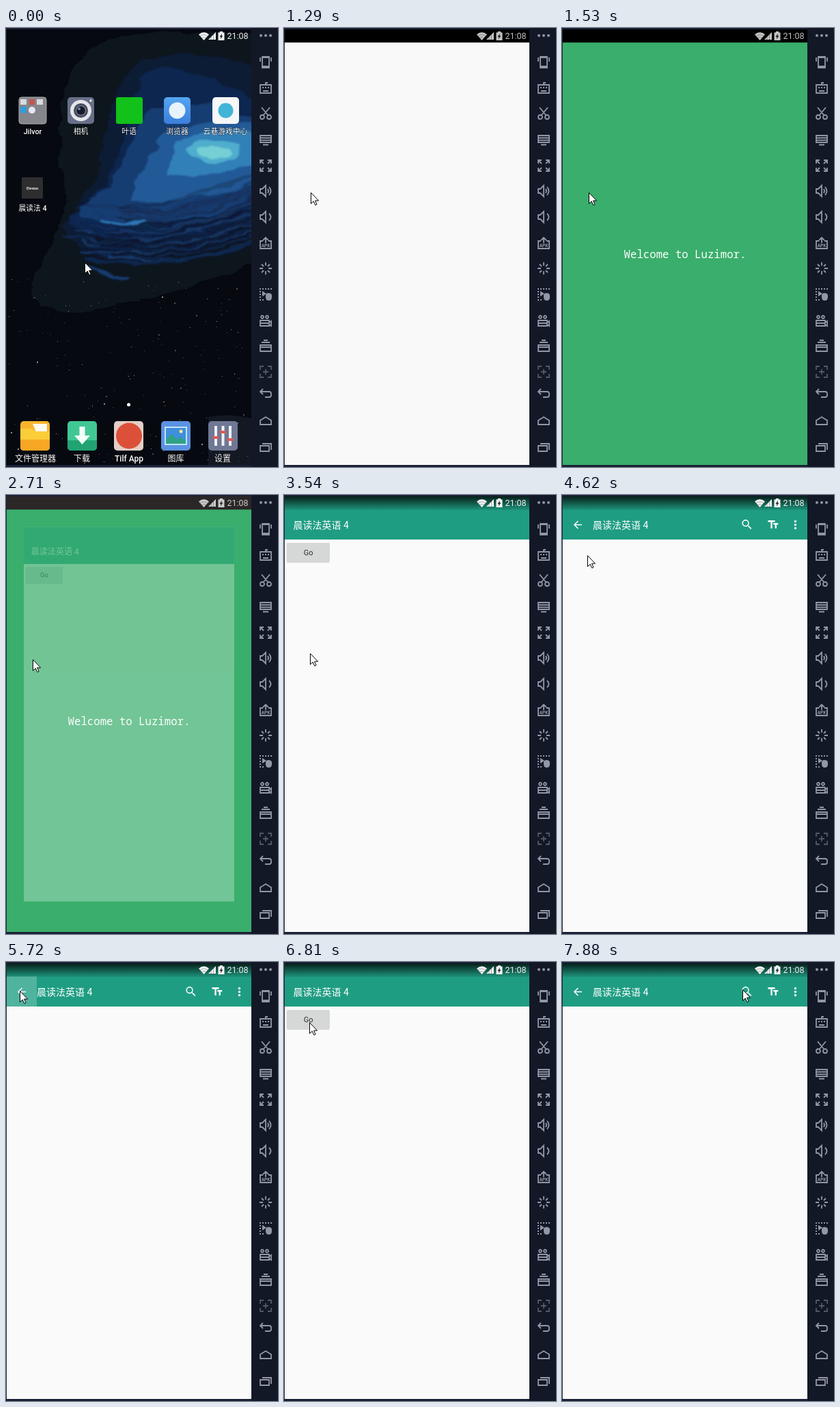
Write an HTML page that moves like this. It is 398x641 px and loops after 8 s.

```html
<!DOCTYPE html>
<html lang="zh">
<head>
<meta charset="utf-8">
<title>Phone screen</title>
<style>
  html, body { margin: 0; height: 100%; overflow: hidden; background: #131826; }
  svg { display: block; width: 398px; height: 641px; }
  text { font-family: Roboto, "Noto Sans CJK SC", "Noto Sans CJK", sans-serif; }
  #labels text { fill: #fff; text-anchor: middle; font-weight: 500; paint-order: stroke; stroke: #0008; stroke-width: 1px; }
  .title { font-size: 14px; fill: #fff; }
  .layer { transform-origin: 180px 320px; }
  #side { fill: none; stroke: #9197a6; stroke-width: 1.8; }
  #side .fill { fill: #9197a6; stroke: none; }
</style>
</head>
<body>
<svg viewBox="0 0 398 641">
  <defs>
    <clipPath id="screen"><path d="M1 2H359V638H1z"/></clipPath>
    <linearGradient id="shade" x2="0" y2="1">
      <stop stop-color="#000" stop-opacity=".8"/><stop offset="1" stop-color="#000" stop-opacity=".06"/>
    </linearGradient>
    <linearGradient id="blue" x2="0" y2="1"><stop stop-color="#55a5f0"/><stop offset="1" stop-color="#3a7fdc"/></linearGradient>
    <filter id="brush" x="-10%" y="-10%" width="120%" height="120%">
      <feTurbulence type="fractalNoise" baseFrequency=".02 .05" numOctaves="3" seed="4"/>
      <feDisplacementMap in="SourceGraphic" scale="18" xChannelSelector="R" yChannelSelector="G"/>
      <feGaussianBlur stdDeviation="1.2"/>
    </filter>
  </defs>

  <g clip-path="url(#screen)">
    <g id="home">
      <path fill="#060910" d="M0 0H360V640H0z"/>
      <g filter="url(#brush)" fill="none">
        <path fill="#0c121f" d="M90 70Q120 12 195 8H380V335Q300 375 220 392Q110 428 50 405Q25 370 60 330Q85 290 88 230Q66 150 90 70z"/>
        <path fill="#0d1a35" d="M195 45Q260 25 380 60V300Q250 335 170 345Q95 330 85 285Q110 260 140 200Q150 90 195 45z"/>
        <path fill="#10264f" d="M205 65Q255 40 380 115V275Q250 318 150 308Q85 295 95 272Q150 240 165 180Q180 100 205 65z"/>
        <path fill="#173d72" d="M205 125Q270 90 380 135V250Q270 292 140 285Q95 278 110 262Q155 235 172 195Q185 145 205 125z"/>
        <path fill="#225a97" d="M228 160Q290 125 380 140V222Q290 255 180 250Q205 195 228 160z"/>
        <path fill="#3180b8" d="M248 168Q300 142 380 152V196Q315 218 238 214z"/>
        <ellipse cx="303" cy="181" rx="38" ry="17" fill="#4fadcd"/>
        <ellipse cx="305" cy="183" rx="24" ry="9" fill="#74cfd4"/>
        <g id="strokes"></g>
        <path stroke="#2d74b4" stroke-width="5" d="M135 283Q170 292 205 282"/>
        <path stroke="#173a6c" stroke-width="5" d="M115 348Q145 362 182 366"/>
      </g>
      <g id="stars"></g>
      <path fill="#242b3a" opacity=".45" d="M296 568Q325 562 359 570V638H296z"/>

      <rect x="19" y="101" width="40" height="39" rx="4" fill="#85868c" stroke="#a9a9ad"/>
      <path fill="#d8dadd" d="M21 104h9v8h-9zM45 104h9v8h-9z"/>
      <path fill="#c8544b" d="M34 104h8v8h-8z"/>
      <path fill="#2d9fda" d="M21 115h9v9h-9z"/>
      <circle cx="38" cy="120" r="5" fill="#e6e6ef"/>

      <rect x="90" y="101" width="39" height="39" rx="5" fill="#686f88"/>
      <circle cx="109.500" cy="120.500" r="15.500" fill="#e4e6ea"/>
      <circle cx="109.500" cy="120.500" r="10.500" fill="#454a5e"/>
      <circle cx="109.500" cy="120.500" r="7" fill="#171a26" stroke="#6d7590" stroke-width="1.500"/>
      <circle cx="107" cy="118" r="2" fill="#7c86a5"/>
      <circle cx="124" cy="106" r="1.700" fill="#f4f4f4"/>

      <rect x="161" y="101" width="39" height="39" rx="3" fill="#12c11a"/>
      <rect x="231" y="101" width="39" height="39" rx="5" fill="url(#blue)"/>
      <circle cx="250.500" cy="120.500" r="12" fill="#e8f2fb"/>
      <rect x="302" y="101" width="39" height="39" rx="5" fill="#f4f6f7"/>
      <circle cx="321.500" cy="120.500" r="11" fill="#42b4d8"/>

      <path fill="#2e2e2f" d="M23 218h31v31h-31z"/>
      <text x="38.500" y="236" text-anchor="middle" fill="#eee" style="font:700 7px 'Liberation Serif',serif">Demo</text>
      <circle cx="179.500" cy="550" r="2.500" fill="#fff"/>

      <g transform="translate(21 574)">
        <rect width="43" height="43" rx="5" fill="#f8b52c"/>
        <path fill="#fffaf0" d="M18 4H39V16H23z"/>
        <path fill="#fbcd38" d="M0 11H17L22 15H43V38a5 5 0 0 1-5 5H5a5 5 0 0 1-5-5z"/>
        <path fill="#f6a723" d="M0 27H43V38a5 5 0 0 1-5 5H5a5 5 0 0 1-5-5z"/>
      </g>
      <g transform="translate(90 574)">
        <rect width="43" height="43" rx="5" fill="#42c794"/>
        <path fill="#22a372" d="M0 28H43V38a5 5 0 0 1-5 5H5a5 5 0 0 1-5-5z"/>
        <path fill="#f3fff9" d="M17.500 8h8v13h7.500L21.500 34 10 21h7.500z"/>
      </g>
      <rect x="158" y="574" width="43" height="43" rx="5" fill="#e2cfc6"/>
      <circle cx="180" cy="595.500" r="19" fill="#dc5039"/>
      <g transform="translate(227 574)">
        <rect width="43" height="43" rx="5" fill="#5b93e2"/>
        <path fill="#3f8fdc" stroke="#c2e2fa" stroke-width="2" d="M6 9H37V34H6z"/>
        <path fill="#2fa184" d="M7 33V27L15 19l8 8 5-4 8 6v4z"/>
        <circle cx="29" cy="15" r="2.500" fill="#f3e88a"/>
      </g>
      <g transform="translate(296 574)">
        <rect width="43" height="43" rx="5" fill="#6f7894"/>
        <path stroke="#eff1f6" stroke-width="4" d="M11 7V36M21.500 7V36M32 7V36"/>
        <path fill="#e5594f" d="M7 22h8v4H7zM17.500 14h8v4h-8zM28 25h8v4h-8z"/>
      </g>
      <g id="labels"></g>
    </g>

    <path id="blank" class="layer" fill="#f9f9f9" d="M1 2H359V638H1z"/>

    <g id="splash" class="layer">
      <path fill="#3aae6c" d="M1 2H359V638H1z"/>
      <text x="180" y="335.500" text-anchor="middle" fill="#fff" style="font:15.700px 'Noto Sans Mono',monospace">Welcome to Luzimor.</text>
    </g>

    <g id="main" class="layer">
      <path fill="#fafafa" d="M1 2H359V638H1z"/>
      <path fill="#1f9d83" d="M1 2H359V65H1z"/>
      <text class="title" x="13.500" y="49">晨读法英语 4</text>
      <path fill="#0002" d="M5 97H66V99H5z"/>
      <rect id="button" x="4" y="70" width="63" height="28" rx="1.500"/>
      <text x="35.700" y="88" text-anchor="middle" font-size="11" fill="#2a2a2a">Go</text>
    </g>

    <g id="page" class="layer">
      <path fill="#fafafa" d="M1 2H359V638H1z"/>
      <path fill="#1f9d83" d="M1 2H359V65H1z"/>
      <path id="backPress" fill="#fff" fill-opacity=".22" d="M1 21H45V65H1z"/>
      <text class="title" x="45" y="49">晨读法英语 4</text>
      <g fill="#fff">
        <path transform="translate(14 34.500) scale(.75)" d="M20 11H7.800l5.600-5.600L12 4l-8 8 8 8 1.400-1.400L7.800 13H20z"/>
        <path transform="translate(261 33.500) scale(.8)" d="M15.500 14h-.8l-.3-.3A6.500 6.500 0 1 0 9.500 16c1.600 0 3.100-.6 4.200-1.600l.3.300v.8l5 5 1.500-1.500zm-6 0a4.500 4.500 0 1 1 0-9 4.500 4.500 0 0 1 0 9z"/>
        <path transform="translate(299.500 34) scale(.78)" d="M2.500 4v3h5v12h3V7h5V4zm19 5h-9v3h3v7h3v-7h3z"/>
        <circle cx="341.500" cy="38.500" r="1.700"/><circle cx="341.500" cy="43.500" r="1.700"/><circle cx="341.500" cy="48.500" r="1.700"/>
      </g>
    </g>

    <path id="gradient" fill="url(#shade)" d="M1 2H359V22H1z"/>
    <g id="bar"><path d="M1 2H359V21H1z"/><path fill="#0003" d="M1 21H359V22H1z"/></g>
    <g id="status" fill="#f4f4f4">
      <path d="M282 9.500Q289.500 3 297 9.500L289.500 18z"/>
      <path fill="none" stroke="#0006" stroke-width=".8" d="M284 12Q289.500 7.500 295 12M286.300 14.500Q289.500 12 292.700 14.500"/>
      <path d="M307 6V17H296z"/><path stroke="#0006" stroke-width=".8" d="M300 12V17M303.500 9V17"/>
      <path d="M313 5h4v1.500h2.500V18h-9V6.500H313z"/>
      <path fill="#222" d="M316 8l-3.500 5h2l-.8 3.500 3.800-5h-2z"/>
      <text x="323.500" y="16" font-size="12.500">21:08</text>
    </g>
    <path id="cursor" fill="#fff" stroke="#000" d="M.5.5v16l3.700-3.500 2.600 5.600 2.300-1-2.500-5.500h5z"/>
  </g>

  <path fill="#131826" d="M359 0H398V641H359z"/>
  <path fill="#1a2036" d="M0 0H359V2H0zM0 638H359V641H0zM0 0H1V641H0z"/>
  <g id="side"></g>
</svg>

<script>
const $ = id => document.getElementById(id);

// Static parts: brush strokes, stars, labels, side bar
let seed = 7;
const random = () => (seed = (seed * 16807) % 2147483647) / 2147483647;

const strokeColors = ['#0c1830', '#1a4880', '#0a1224', '#143262'];
$('strokes').innerHTML = Array.from({ length: 36 }, (_, i) => {
  const depth = i / 36, x = 100 - 30 * depth + 90 * random();
  const left = 255 + 85 * depth, right = 205 + 105 * depth;
  return `<path d="M${x} ${left}Q${x + 120} ${left + 22} 380 ${right}" opacity="${.3 + .4 * depth}"
    stroke="${strokeColors[i % 4]}" stroke-width="${1.5 + 4 * random()}"/>`;
}).join('');

const starColors = ['#454c59', '#8e9098', '#6d4548'];
$('stars').innerHTML = Array.from({ length: 190 }, (_, i) => {
  const x = 4 + random() * 352, y = 635 - 270 * random() ** 1.3, size = random() < .1 ? 2 : 1;
  return `<rect x="${x | 0}" y="${y | 0}" width="${size}" height="${size}" fill="${starColors[i % 3]}"/>`;
}).join('');

const labels = [
  [39, 154.5, 'Jilvor'], [109.5, 154.5, '相机'], [180, 154.5, '叶语'], [250.5, 154.5, '浏览器'],
  [321, 154.5, '云巷游戏中心'], [39, 267, '晨读法 4'],
  [43, 633, '文件管理器'], [111, 633, '下载'], [180, 633, 'Tilf App'], [248.5, 633, '图库'], [317, 633, '设置'],
];
$('labels').innerHTML = labels.map(([x, y, s]) =>
  `<text x="${x}" y="${y}" font-size="${y > 600 ? 12 : 10.8}">${s}</text>`).join('');

// Side icons: centre y, stroked path, filled path
const icons = [
  [11, '', 'M-9 0a2 2 0 1 1 4 0a2 2 0 1 1-4 0M-2 0a2 2 0 1 1 4 0a2 2 0 1 1-4 0M5 0a2 2 0 1 1 4 0a2 2 0 1 1-4 0'],
  [50, 'M-5-8H5V8H-5zM-8-7V-1M8-7V-1', 'M-5-9H5V-6H-5zM-5 5H5V9H-5z'],
  [88, 'M-8-5H8V7H-8zM0-5V-8H3M-4 4H4', 'M-5-2h2v2h-2zM-1-2h2v2h-2zM3-2h2v2h-2z'],
  [125, 'M-6-9L4 3M6-9L-4 3M-8 5a3 3 0 1 0 6 0a3 3 0 1 0-6 0M2 5a3 3 0 1 0 6 0a3 3 0 1 0-6 0', ''],
  [163, 'M-8-6H8V4H-8zM-8-2.500H8M-8 .800H8M-4 7.500H4', ''],
  [201, 'M-8-3V-8H-3M3-8H8V-3M8 3V8H3M-3 8H-8V3M-7-7L-3-3M7-7L3-3M-7 7L-3 3M7 7L3 3', ''],
  [238, 'M-8-3H-5L0-8V8L-5 3H-8zM3-3Q5 0 3 3M5-6Q10 0 5 6', ''],
  [276, 'M-8-3H-5L0-8V8L-5 3H-8zM5-5Q10 0 5 5', ''],
  [314, 'M-4-3H-8V8H8V-3H4M0 0V-8M-4-4L0-8L4-4', ''],
  [351, 'M0-9V-4M0 9V4M-9 0H-4M9 0H4M-6-6L-3-3M6 6L3 3M-6 6L-3 3M6-6L3-3', ''],
  [389, '', 'M-9-9h2v2h-2zM-5-9h2v2h-2zM-1-9h2v2h-2zM3-9h2v2h-2zM7-9h2v2h-2zM-9-5h2v2h-2zM-9-1h2v2h-2zM-9 3h2v2h-2zM-9 7h2v2h-2zM-5 7h2v2h-2zM-5-5L1-1L-5 3zM0 2Q0-2 4-2Q9-2 9 2V4Q9 9 4.500 9Q0 9 0 4z'],
  [427, 'M-8 0H5V8H-8zM-8 4H5M5 3L8 1V8L5 6M-7-5a2 2 0 1 0 4 0a2 2 0 1 0-4 0M0-5a2 2 0 1 0 4 0a2 2 0 1 0-4 0', ''],
  [464, 'M-8-1H8V8H-8zM-8 2H8', 'M-3-9H3V-7H-3zM-6-6H6V-4H-6z'],
  [502, 'M-8-3V-8H-3M3-8H8V-3M8 3V8H3M-3 8H-8V3M0-4V4M-4 0H4', ''],
  [535, 'M-4-8L-8-4L-4 0M-8-4H5Q8-4 8-1V1Q8 4 5 4H-1', ''],
  [574, 'M-8 5V-1L0-6L8-1V5z', ''],
  [612, 'M-8-2H5V6H-8zM-5-5H8V4', ''],
];
$('side').innerHTML = icons.map(([y, line, solid]) =>
  `<g transform="translate(380 ${y})" opacity="${y === 502 ? .5 : 1}"><path d="${line}"/><path class="fill" d="${solid}"/></g>`
).join('') + '<text class="fill" x="380" y="320" font-size="6.500" font-weight="700" text-anchor="middle">APK</text>';

// Each track holds [time, ...values]; a value stays until the next entry
const open = (a, b, c) => [[a, .29, .86], [b, .85, .97], [c, 1, 1]];
const layers = {
  blank: [[0, 0, 1], ...open(1010, 1140, 1290)],
  splash: [[0, 0, 1], [1410, .5, 1], [1530, 1, 1]],
  main: [[0, 0, 1], ...open(2710, 2830, 2980)],
  page: [[0, 0, 1], ...open(4350, 4470, 4620), [5870, .5, 1], [6020, 0, 1], ...open(6960, 7080, 7230)],
};
const cursor = [
  [0, 115, 342], [300, 80, 306], [430, 42, 267], [580, 39, 240],
  [3540, 38, 231], [3690, 37, 165], [3810, 37, 111], [3960, 37, 88],
  [5290, 32, 76], [5410, 26, 60], [5570, 20, 42],
  [6290, 24, 54], [6410, 32, 76], [6540, 37, 88],
  [7480, 191, 85], [7630, 228, 62], [7750, 253, 47], [7880, 264, 40],
];
const barColor = [[0, 'none'], [1140, '#000'], [2710, '#2b2727'], [2830, 'none']];

const at = (track, t) => track.findLast(entry => entry[0] <= t).slice(1);
const within = (t, from, to) => t >= from && t < to;

function draw(t) {
  for (const id in layers) {
    const [alpha, scale] = at(layers[id], t);
    $(id).style.opacity = alpha;
    $(id).style.transform = `scale(${scale})`;
  }
  $('cursor').setAttribute('transform', `translate(${at(cursor, t)})`);
  const [color] = at(barColor, t);
  $('bar').style.display = color === 'none' ? 'none' : '';
  $('bar').setAttribute('fill', color);
  $('status').style.opacity = color === 'none' ? 1 : .8;
  $('gradient').style.opacity = t >= 2830 ? 1 : 0;
  $('button').setAttribute('fill', within(t, 4080, 4200) || within(t, 6690, 6810) ? '#b9baba' : '#d6d7d7');
  $('backPress').style.opacity = within(t, 5720, 5870) ? 1 : 0;
}

const start = performance.now();
(function tick() {
  draw((performance.now() - start) % 8000);
  requestAnimationFrame(tick);
})();
</script>
</body>
</html>
```
